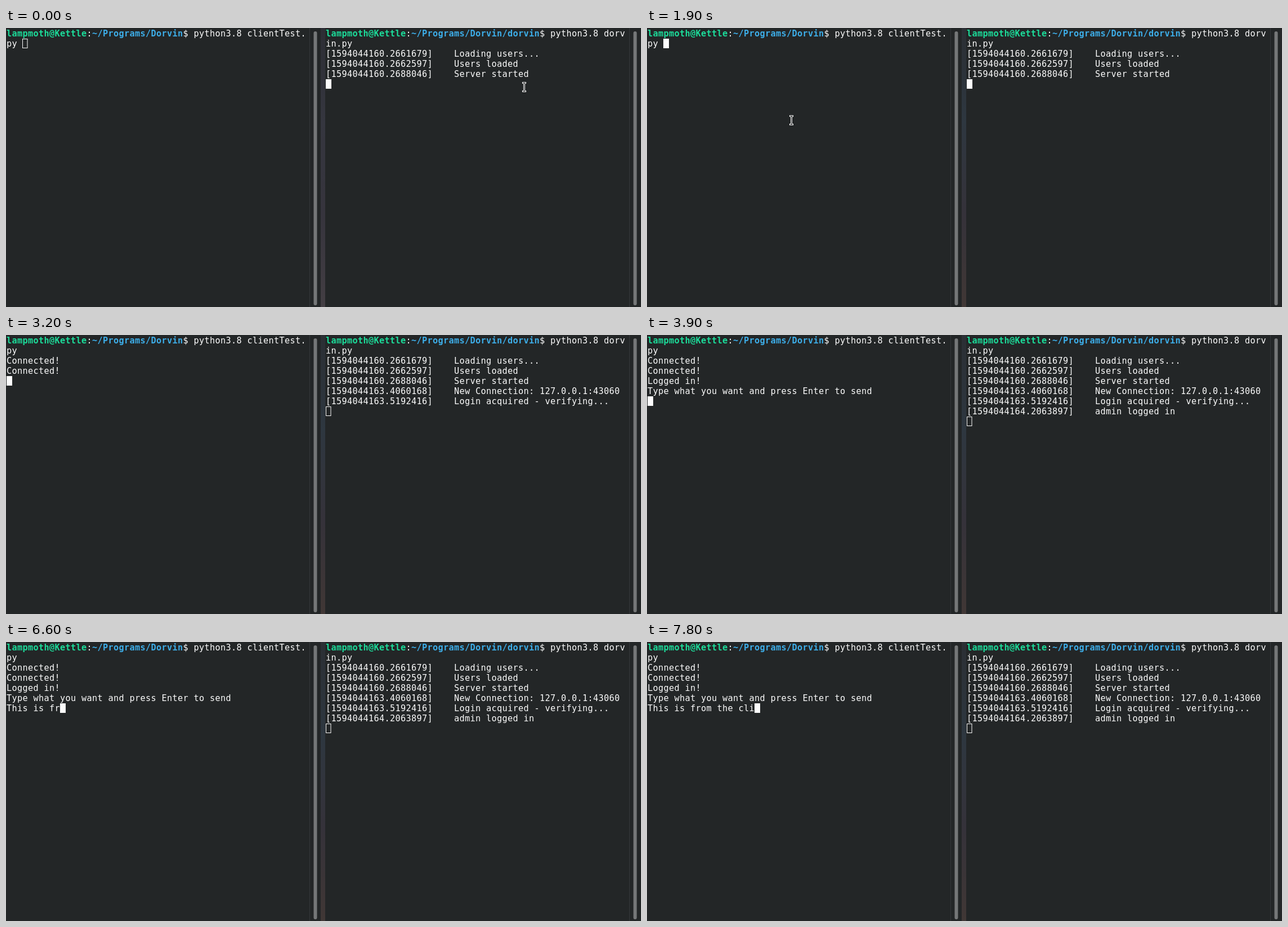
These frames come from a looping animation (1128x496 px, 8 s). An HTML page with a canvas:

```html
<!DOCTYPE html>
<html lang="en">
<head>
<meta charset="utf-8">
<title>Two terminals</title>
<style>
  html, body { margin: 0; width: 100%; height: 100%; overflow: hidden; background: #232627; }
  canvas { display: block; }
</style>
</head>
<body>
<canvas id="stage" width="1128" height="496"></canvas>
<script>
const ctx = document.getElementById('stage').getContext('2d');
const LOOP = 8000;
const CELL_W = 9.5, CELL_H = 18.05, TOP = 0.95, BASELINE = 14.7;
const LEFT = 0.95, RIGHT = 568;
const BG = '#232627', FG = '#fcfcfc', GREEN = '#1cdc9a', BLUE = '#3daee9';
const FONT = '15.2px "DejaVu Sans Mono", monospace';

// [time, characters typed so far]
const MESSAGE = 'This is from the cli';
const TYPING = [[5400, 1], [5600, 2], [5800, 4], [6000, 5], [6200, 7], [6400, 9], [6600, 10],
  [6800, 12], [7000, 14], [7100, 15], [7400, 17], [7600, 18], [7800, 20]];

// [time, progress of the pointer between its two resting places]
const POINTER = [[0, 0], [1400, 0.12], [1500, 0.5], [1600, 0.86], [1700, 1]];

// [time, text]
const SERVER_LOG = [
  [0, '[1594044160.2661679]    Loading users...'],
  [0, '[1594044160.2662597]    Users loaded'],
  [0, '[1594044160.2688046]    Server started'],
  [3200, '[1594044163.4060168]    New Connection: 127.0.0.1:43060'],
  [3200, '[1594044163.5192416]    Login acquired - verifying...'],
  [3900, '[1594044164.2063897]    admin logged in']
];
const CLIENT_LOG = [
  [3200, 'Connected!'],
  [3200, 'Connected!'],
  [3900, 'Logged in!'],
  [3900, 'Type what you want and press Enter to send']
];

function valueAt(steps, t, start) {
  return steps.reduce((v, [time, next]) => t >= time ? next : v, start);
}

function rect(x, y, w, h, color) {
  ctx.fillStyle = color;
  ctx.fillRect(x, y, w, h);
}

function write(x, row, col, text, color = FG, bold = false) {
  ctx.font = (bold ? 'bold ' : '') + FONT;
  ctx.fillStyle = color;
  const y = BASELINE + row * CELL_H;
  [...text].forEach((ch, i) => {
    if (ch !== ' ') ctx.fillText(ch, x + (col + i) * CELL_W, y);
  });
}

function prompt(x, path, command) {
  const user = 'lampmoth@Kettle';
  let col = 0;
  for (const [text, color, bold] of [[user, GREEN, true], [':', FG], [path, BLUE, true], ['$ ' + command, FG]]) {
    write(x, 0, col, text, color, bold);
    col += text.length;
  }
}

function textCursor(x, row, col, filled) {
  const left = Math.round(x + col * CELL_W), top = Math.round(TOP + row * CELL_H);
  if (filled) {
    rect(left, top, 10, 17, FG);
  } else {
    ctx.strokeStyle = FG;
    ctx.lineWidth = 1;
    ctx.strokeRect(left + 0.5, top + 0.5, 8.5, 16);
  }
}

function scrollbar(x) {
  rect(x, 0, 1, 496, '#35383a');
  ctx.fillStyle = '#757778';
  ctx.beginPath();
  ctx.roundRect(x + 7.5, 6, 6, 487, 3);
  ctx.fill();
}

function divider(t) {
  const tones = t < 1900
    ? ['#2d2e35', '#35363f', '#36343d', '#433e43']
    : ['#2b2f34', '#2e3740', '#35323a', '#403735'];
  const g = ctx.createLinearGradient(0, 0, 0, 496);
  tones.forEach((c, i) => g.addColorStop(i / 3, c));
  rect(559, 0, 8, 496, g);
}

function pointer(t) {
  if (t >= 2800) return;
  const p = valueAt(POINTER, t, 0);
  const x = Math.round(920 - 664 * p), y = Math.round(105 + 59 * p);
  rect(x - 3, y - 9, 7, 3, FG);
  rect(x - 3, y + 6, 7, 3, FG);
  rect(x - 1, y - 8, 3, 16, FG);
  rect(x - 2, y - 8, 5, 1, '#111314');
  rect(x - 2, y + 7, 5, 1, '#111314');
  rect(x, y - 8, 1, 16, '#111314');
}

function showLog(x, log, t) {
  const shown = log.filter(([time]) => t >= time);
  shown.forEach(([, text], i) => write(x, i + 2, 0, text));
  return shown.length + 2;
}

function draw(t) {
  rect(0, 0, 1128, 496, BG);
  scrollbar(539);
  scrollbar(1107);
  divider(t);

  prompt(LEFT, '~/Programs/Dorvin', 'python3.8 clientTest.');
  write(LEFT, 1, 0, 'py');
  const row = showLog(LEFT, CLIENT_LOG, t);
  const typed = valueAt(TYPING, t, 0);
  write(LEFT, row, 0, MESSAGE.slice(0, typed));
  if (t < 3000) textCursor(LEFT, 1, 3, t >= 1900);
  else textCursor(LEFT, row, typed, true);

  prompt(RIGHT, '~/Programs/Dorvin/dorvin', 'python3.8 dorv');
  write(RIGHT, 1, 0, 'in.py');
  textCursor(RIGHT, showLog(RIGHT, SERVER_LOG, t), 0, t < 2400);

  pointer(t);
}

const start = performance.now();
function tick() {
  draw((performance.now() - start) % LOOP);
  requestAnimationFrame(tick);
}
tick();
</script>
</body>
</html>
```
